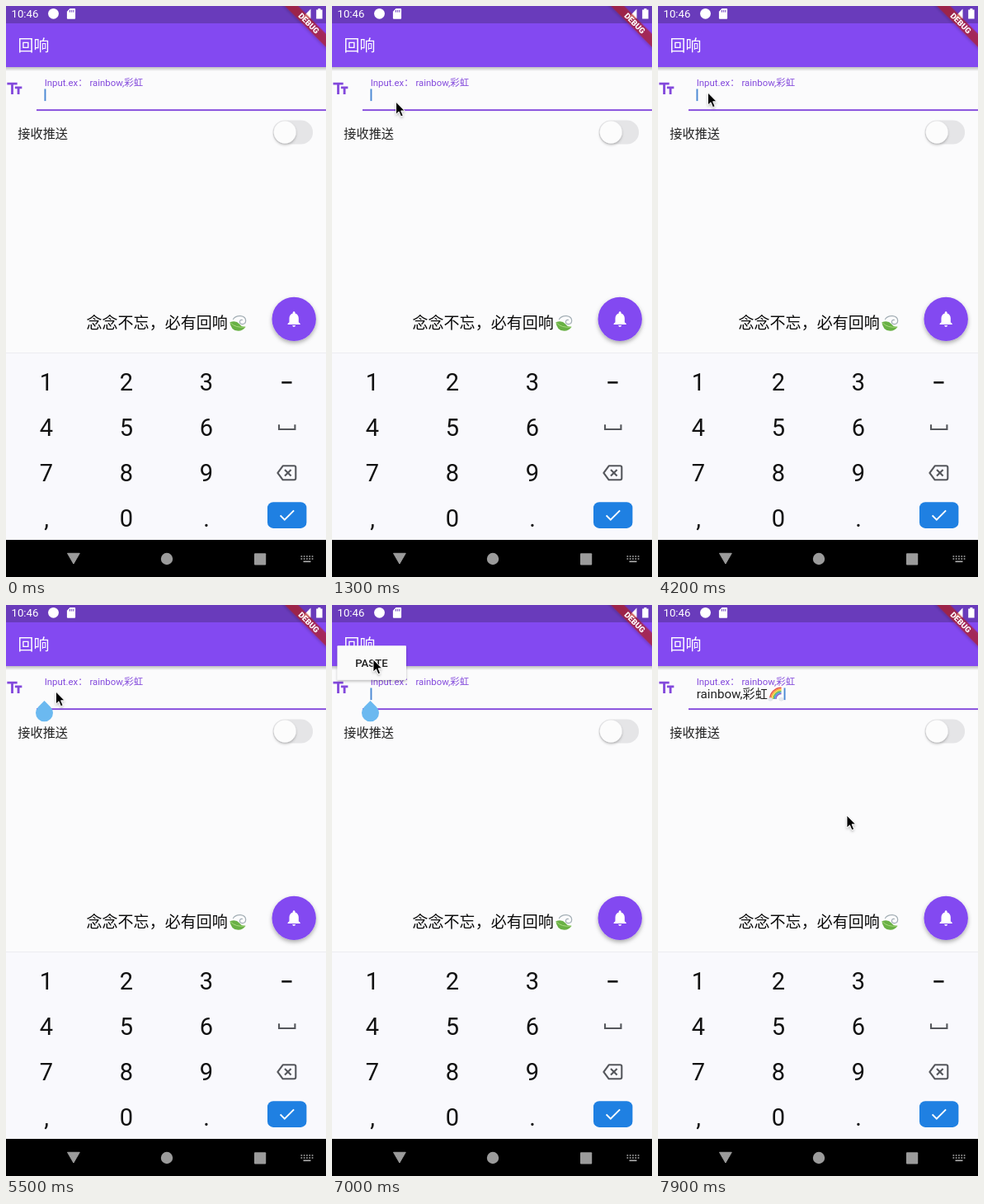
Recreate the animation shown at these times as an HTML page. Size 388x692 px, loop 8 s.

```html
<!DOCTYPE html>
<html lang="zh-CN">
<head>
<meta charset="utf-8">
<style>
  html, body { margin: 0; width: 100%; height: 100%; overflow: hidden; background: #fbfbfc; }
  svg { display: block; width: 100vw; height: 100vh; }
  text { font-family: Roboto, "Noto Sans CJK SC", "Noto Sans CJK", sans-serif; white-space: pre; }
  .keys text { font-size: 29px; text-anchor: middle; fill: #111; }
  .icon { fill: none; stroke: #55575c; stroke-width: 2.1; }
</style>
</head>
<body>
<svg viewBox="0 0 388 692" preserveAspectRatio="none">
  <defs>
    <filter id="soft" x="-40%" y="-40%" width="180%" height="200%">
      <feDropShadow dx="0" dy="2.5" stdDeviation="2.6" flood-color="#000" flood-opacity=".32"/>
    </filter>
    <filter id="light" x="-40%" y="-40%" width="180%" height="200%">
      <feDropShadow dx="0" dy="1.8" stdDeviation="1.6" flood-color="#000" flood-opacity=".25"/>
    </filter>
    <linearGradient id="fade" x2="0" y2="1">
      <stop stop-color="#000" stop-opacity=".24"/>
      <stop offset="1" stop-color="#000" stop-opacity="0"/>
    </linearGradient>
  </defs>

  <rect width="388" height="692" fill="#fbfbfc"/>

  <!-- app bar -->
  <rect y="74" width="388" height="5" fill="url(#fade)"/>
  <rect width="388" height="74" fill="#8349f1"/>
  <rect width="388" height="21" fill="#693bbb"/>
  <text x="6.5" y="14.3" font-size="13.2" fill="#fff">10:46</text>
  <circle cx="57.5" cy="9.3" r="6.4" fill="#fff"/>
  <path d="M77.5 3h5.6q1 0 1 1v10.8q0 1-1 1h-8.2q-1 0-1-1V6.7z" fill="#fff"/>
  <path d="M77.5 5v2.6M79.7 5v2.6M81.9 5v2.6" stroke="#693bbb"/>
  <path d="M369.5 3.5v11.8h-11.5z" fill="#fff"/>
  <path d="M378.4 3h3v1.4h2.2v11h-7.4v-11h2.2z" fill="#fff"/>
  <text x="14.5" y="54.8" font-size="18.9" fill="#fff">回响</text>

  <!-- input row -->
  <path transform="translate(-1 89) scale(.946)" fill="#8349dc" d="M2.5 4v3h5v12h3V7h5V4zM21.5 9h-9v3h3v7h3v-7h3z"/>
  <text x="46.7" y="97.2" font-size="11.4" fill="#8349dc">Input.ex： rainbow,彩虹</text>
  <rect x="37" y="125.2" width="351" height="1.9" fill="#8349dc"/>
  <g id="typed">
    <text x="46.7" y="113" font-size="15.2" fill="#222">rainbow,彩虹</text>
    <g id="bow" fill="none" stroke-width="1.5"></g>
    <g fill="#e6eaf0" stroke="#cfd6df" stroke-width=".4">
      <ellipse cx="136.3" cy="114.2" rx="2.6" ry="2"/>
      <ellipse cx="149.5" cy="114.2" rx="2.6" ry="2"/>
    </g>
  </g>
  <rect id="caret" x="46.5" y="100.5" width="1.9" height="14.6" fill="#4a88d4"/>
  <path id="handle" d="M46.5 116l7.4 7.4a10.5 10.5 0 1 1-14.8 0z" fill="#6bb9f0"/>

  <!-- switch row -->
  <text x="14.3" y="160" font-size="15.2" fill="#222">接收推送</text>
  <rect x="323.5" y="138.5" width="48.6" height="29" rx="14.5" fill="#e5e5e7"/>
  <circle cx="338.2" cy="153" r="13.4" fill="#fcfcfc" filter="url(#light)"/>

  <text x="97.5" y="391" font-size="19.05" fill="#0a0a0a">念念不忘，必有回响</text>
  <g fill="none" stroke-linecap="round">
    <path d="M271.4 383.2q7.5-2.8 11.5 2q3 4.2 7.8 3.5q-4 5.6-10.6 4.9q-7.4-1-8.7-10.4z" fill="#69b145"/>
    <path d="M272.5 384.3q6 6.2 17 4.7" stroke="#a9d97f" stroke-width="1"/>
    <path d="M275.5 379.5q3-4.3 9-3.8q6.2.8 6.2 5.8q-.4 4.3-4.4 4.1q-3.3-.4-2.8-3.4q.6-2.3 3-1.7" stroke="#a3aeb5" stroke-width="1.2"/>
  </g>

  <!-- action button -->
  <circle cx="349.2" cy="379.4" r="26.7" fill="#8349f1" filter="url(#soft)"/>
  <path transform="translate(337.8 368) scale(.946)" fill="#fff" d="M12 22c1.1 0 2-.9 2-2h-4c0 1.1.9 2 2 2zm6-6v-5c0-3.07-1.64-5.64-4.5-6.32V4c0-.83-.67-1.5-1.5-1.5s-1.5.67-1.5 1.5v.68C7.63 5.36 6 7.92 6 11v5l-2 2v1h16v-1z"/>

  <!-- keypad -->
  <rect y="420" width="388" height="227" fill="#f9f9fd"/>
  <path d="M0 420.5h388" stroke="#ececf0"/>
  <g class="keys" id="keys"></g>
  <rect x="334.3" y="455" width="12.2" height="2.6" fill="#111"/>
  <path class="icon" d="M331 507.3v5.7h19.4v-5.7"/>
  <path class="icon" stroke-linejoin="round" d="M335.7 557.3h13.6q2 0 2 2v13q0 2-2 2h-13.6l-6.3-8.5z"/>
  <path class="icon" d="M338 562l7.6 7.6m0-7.6l-7.6 7.6"/>
  <rect x="317" y="601.3" width="47.4" height="31.6" rx="7" fill="#1f80e2"/>
  <path d="M332.6 617.4l5.2 5.2l11.3-11.2" fill="none" stroke="#fff" stroke-width="2"/>

  <!-- navigation bar -->
  <rect y="647" width="388" height="45" fill="#000"/>
  <g fill="#9b9b9b">
    <path d="M74.5 663.3h14.8l-7.4 12.8z" stroke="#9b9b9b" stroke-linejoin="round"/>
    <circle cx="195" cy="670" r="7.2"/>
    <rect x="301" y="663.2" width="14.2" height="14.2" rx="1"/>
  </g>
  <g stroke="#b0b0b0" stroke-width="1.6" fill="none">
    <path d="M357.5 667h15M357.5 670h15" stroke-dasharray="1.7 1.6"/>
    <path d="M360.5 673.3h9"/>
  </g>

  <g id="menu">
    <rect x="6.4" y="49.2" width="83.6" height="41.6" rx="1" fill="#fafafa" filter="url(#light)"/>
    <text x="28.3" y="75" font-size="13.2" font-weight="500" fill="#222">PASTE</text>
  </g>

  <!-- corner ribbon -->
  <g transform="translate(388 0) rotate(45)">
    <rect x="-40" y="23.8" width="80" height="11.4" fill="#b71c1c" fill-opacity=".66" filter="url(#light)"/>
    <text y="33" font-size="9.7" font-weight="900" text-anchor="middle" fill="#fff">DEBUG</text>
  </g>

  <path id="mouse" d="M0 0v15l3.5-3.2l2.5 5.9l2.6-1.1l-2.5-5.8h4.5z" fill="#000" stroke="#fff" stroke-width=".9" filter="url(#light)"/>
</svg>
<script>
  const SVG = "http://www.w3.org/2000/svg";
  const $ = id => document.getElementById(id);
  const add = (parent, tag, attrs, label = "") => {
    const el = document.createElementNS(SVG, tag);
    for (const k in attrs) el.setAttribute(k, attrs[k]);
    el.textContent = label;
    parent.append(el);
  };

  ["123", "456", "789", ",0."].forEach((row, r) =>
    [...row].forEach((key, c) =>
      add($("keys"), "text", { x: 49 + 97 * c, y: 465.8 + 55 * r }, key)));

  ["#e8504a", "#f59a3c", "#f7d64a", "#62b95a", "#4b9be0", "#9067c6"].forEach((color, i) => {
    const r = 13.8 - i * 1.45;
    add($("bow"), "path", { d: `M${149.5 - r} 114a${r} ${r} 0 0 1 ${r} ${-r}`, stroke: color });
  });

  const LOOP = 8000, STEP = 100;
  const ENTER = 200, TAP = 4400, MENU = 6300, PASTE = 7300;

  // time, x, y of the pointer tip
  const path = [
    [200, 372, 640], [500, 190, 300], [800, 95, 130], [1000, 95, 130],
    [1500, 66, 107], [2100, 66, 107], [2400, 63, 106], [3600, 63, 106],
    [3700, 60.5, 105], [6400, 60.5, 105], [6900, 50, 66], [7400, 50, 66],
    [7700, 150, 165], [7800, 150, 165], [7900, 229, 255]
  ];

  // caret toggles every 500 ms
  const caretOn = t => t >= PASTE || Math.floor((t + 100) / 500) % 2 === 0;
  const during = (t, a, b) => t >= a && t < b ? Math.min(1, (t - a + STEP) / 200) : 0;
  const show = (id, v) => $(id).setAttribute("opacity", Number(v));

  function pointer(t) {
    const i = path.findIndex(p => p[0] > t);
    if (i < 0) return path[path.length - 1].slice(1);
    if (i === 0) return path[0].slice(1);
    const a = path[i - 1], b = path[i];
    const u = (t - a[0]) / (b[0] - a[0]);
    return [a[1] + (b[1] - a[1]) * u, a[2] + (b[2] - a[2]) * u];
  }

  function draw(now) {
    const t = Math.floor((now % LOOP) / STEP) * STEP;
    const [x, y] = pointer(t);
    $("mouse").setAttribute("transform", `translate(${x} ${y})`);
    show("mouse", t >= ENTER);
    show("caret", caretOn(t));
    $("caret").setAttribute("x", t >= PASTE ? 152.6 : 46.5);
    show("typed", t >= PASTE);
    show("handle", during(t, TAP, PASTE));
    show("menu", during(t, MENU, PASTE));
  }

  const start = performance.now();
  const tick = now => {
    draw(Math.max(0, now - start));
    requestAnimationFrame(tick);
  };
  draw(0);
  requestAnimationFrame(tick);
</script>
</body>
</html>
```
